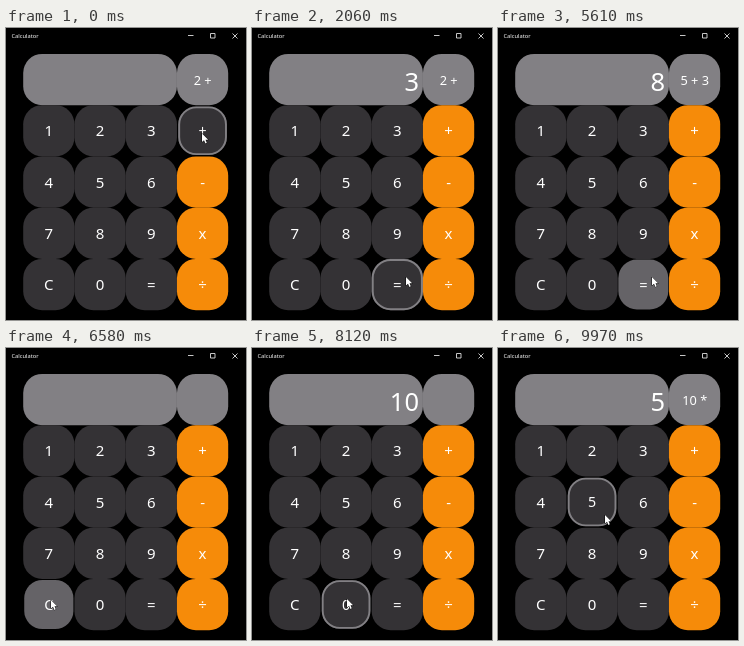
Recreate the animation shown at these times as an HTML page with a canvas. Size 240 px wide and 292 px high, loop 10 s.

```html
<!DOCTYPE html>
<html lang="en">
<head>
<meta charset="utf-8">
<title>Calculator</title>
<style>
html, body { margin: 0; width: 100%; height: 100%; overflow: hidden; background: #000; }
canvas { display: block; }
</style>
</head>
<body>
<canvas id="stage"></canvas>
<script>
const W = 240, H = 292, LOOP = 10000;
const LEFT = 17.2, TOP = 25.9, CELL = 51.25, RADIUS = 19;
const GRAY = '#828084', DARK = '#343235', PRESSED = '#656367', ORANGE = '#f68b09';
const FONT = '"Noto Sans", "Open Sans", sans-serif';
const LABELS = ['123+', '456-', '789x', 'C0=÷'];

// time, display, history
const READOUT = [
  [0, '', '2 +'], [1270, '3', '2 +'], [2270, '5', '2 + 3'], [5610, '8', '5 + 3'],
  [6580, '', ''], [7450, '1', ''], [8050, '10', ''], [8880, '', '10 *'], [9850, '5', '10 *']
];
// time, key
const PRESSES = [
  [-110, '+'], [1240, '3'], [2240, '='], [5610, '='], [6550, 'C'],
  [7390, '1'], [8020, '0'], [8850, 'x'], [9820, '5']
];
// time, pointer tip x, y
const POINTER = [
  [0, 196, 105.5], [540, 196, 105.5], [580, 172, 106], [900, 172, 106], [940, 160, 121],
  [1600, 160, 121], [1850, 174, 190], [2060, 154, 249], [3450, 154, 249], [3780, 188, 115],
  [3920, 190, 62], [4080, 187, 80], [4420, 149, 246], [4480, 149, 246], [4610, 154, 249],
  [5750, 154, 249], [6270, 45, 252], [6850, 45, 252], [7330, 42, 98], [7560, 42, 98],
  [7960, 95, 251], [8170, 95, 251], [8650, 202, 203], [9030, 202, 203], [9680, 107, 167],
  [LOOP, 107, 167]
];

const canvas = document.getElementById('stage');
const ratio = window.devicePixelRatio || 1;
canvas.width = W * ratio;
canvas.height = H * ratio;
canvas.style.width = W + 'px';
canvas.style.height = H + 'px';
const ctx = canvas.getContext('2d');
const arrow = new Path2D('M0 0V8.6L2 6.8 3.4 9.9 4.8 9.3 3.5 6.3H6.2Z');

const clamp = v => Math.max(0, Math.min(1, v));
const smooth = v => v * v * (3 - 2 * v);

function pointerAt(t) {
  const i = POINTER.findIndex(p => p[0] > t);
  const [t0, x0, y0] = POINTER[i - 1], [t1, x1, y1] = POINTER[i];
  const k = smooth((t - t0) / (t1 - t0));
  return [x0 + (x1 - x0) * k, y0 + (y1 - y0) * k];
}

function pressState(key, t) {
  const press = PRESSES.findLast(p => p[1] === key && p[0] <= t);
  const age = press ? t - press[0] : Infinity;
  const squeeze = clamp((age + 50) / 100) * (1 - smooth(clamp((age - 200) / 170)));
  return { down: age < 100, scale: 1 - 0.05 * squeeze };
}

function text(str, x, y, size, align = 'center') {
  ctx.font = `${size}px ${FONT}`;
  ctx.textAlign = align;
  ctx.fillStyle = '#fff';
  ctx.fillText(str, x, y);
}

function panel(x, y, w, h, fill) {
  ctx.beginPath();
  ctx.roundRect(x, y, w, h, RADIUS);
  ctx.fillStyle = fill;
  ctx.fill();
}

function drawKey(label, col, row, t, hovered) {
  const { down, scale } = pressState(label, t);
  const half = CELL / 2;
  ctx.save();
  ctx.translate(LEFT + (col + 0.5) * CELL, TOP + (row + 1.5) * CELL);
  ctx.scale(scale, scale);
  panel(-half, -half, CELL, CELL, down ? PRESSED : hovered || col < 3 ? DARK : ORANGE);
  if (hovered && !down) {
    ctx.beginPath();
    ctx.roundRect(1 - half, 1 - half, CELL - 2, CELL - 2, RADIUS - 1);
    ctx.strokeStyle = GRAY;
    ctx.lineWidth = 2;
    ctx.stroke();
  }
  text(label, 0, 5.6, 15);
  ctx.restore();
}

function drawTitleBar() {
  text('Calculator', 5.5, 10, 5.7, 'left');
  ctx.strokeStyle = '#ddd';
  ctx.lineWidth = 0.9;
  ctx.beginPath();
  ctx.moveTo(182, 7.5);
  ctx.lineTo(187.5, 7.5);
  ctx.rect(204.5, 5.5, 4.5, 4.5);
  ctx.moveTo(226.5, 5.5);
  ctx.lineTo(231.5, 10.5);
  ctx.moveTo(231.5, 5.5);
  ctx.lineTo(226.5, 10.5);
  ctx.stroke();
}

function drawPointer(x, y) {
  ctx.save();
  ctx.translate(x, y);
  ctx.strokeStyle = '#000';
  ctx.lineWidth = 0.9;
  ctx.stroke(arrow);
  ctx.fillStyle = '#fff';
  ctx.fill(arrow);
  ctx.restore();
}

function draw(t) {
  const [px, py] = pointerAt(t);
  const hoverCol = Math.floor((px - LEFT) / CELL);
  const hoverRow = Math.floor((py - TOP) / CELL) - 1;
  const [, display, history] = READOUT.findLast(r => r[0] <= t);

  ctx.setTransform(ratio, 0, 0, ratio, 0, 0);
  ctx.fillStyle = '#000';
  ctx.fillRect(0, 0, W, H);
  drawTitleBar();
  panel(LEFT, TOP, CELL * 3, CELL, GRAY);
  panel(LEFT + CELL * 3, TOP, CELL, CELL, GRAY);
  text(display, 167, 62.5, 25.5, 'right');
  text(history, 196.7, 56.6, 12.8);
  LABELS.forEach((keys, row) => [...keys].forEach((label, col) =>
    drawKey(label, col, row, t, col === hoverCol && row === hoverRow)));
  drawPointer(px, py);
}

const start = performance.now();
function frame() {
  draw((performance.now() - start) % LOOP);
  requestAnimationFrame(frame);
}
frame();
</script>
</body>
</html>
```
